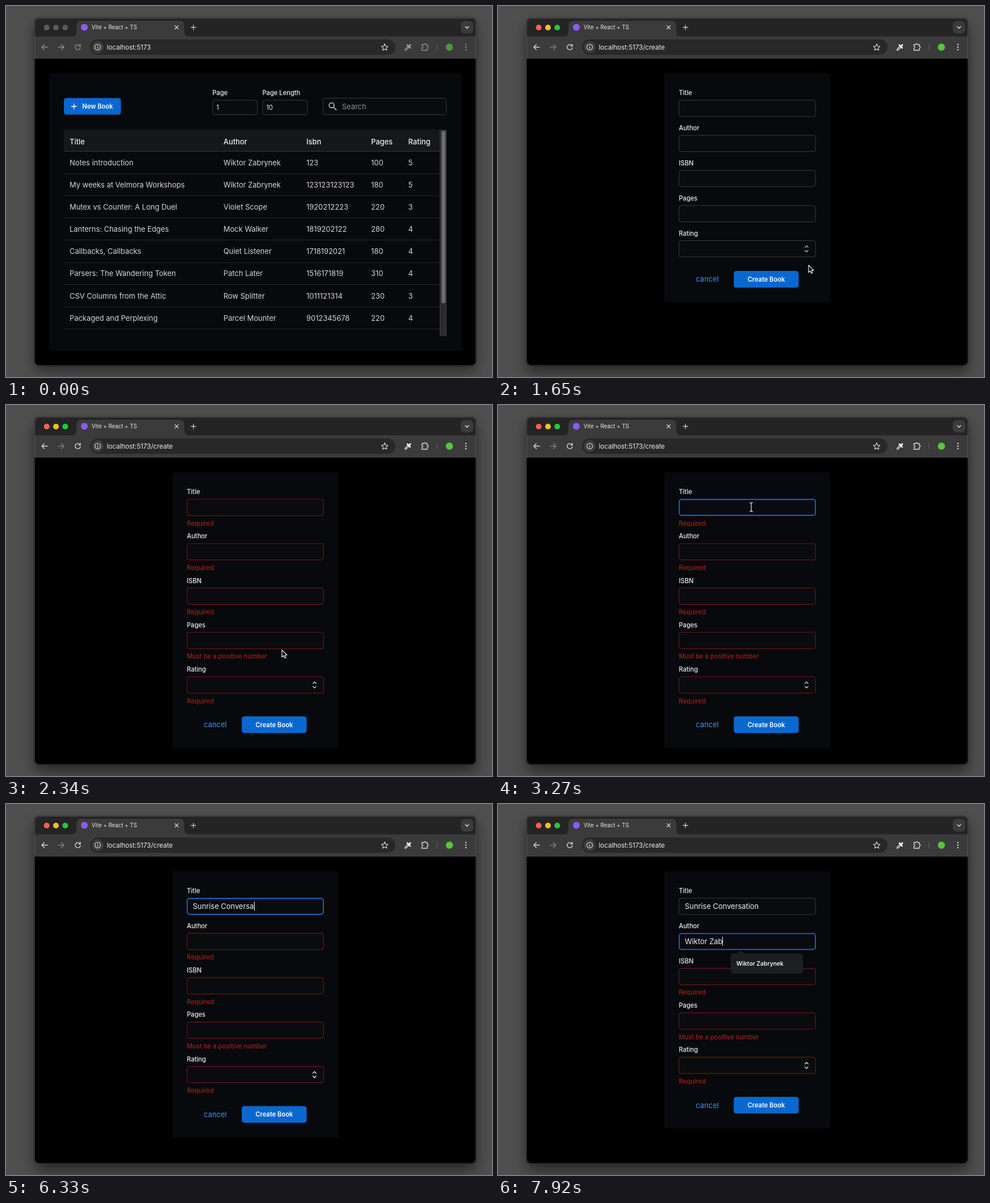
An HTML page that plays this animation: 856x654 px, repeating every 8 s.

```html
<!DOCTYPE html>
<html lang="en">
<head>
<meta charset="utf-8">
<title>Book form</title>
<style>
html, body { margin: 0; width: 100%; height: 100%; overflow: hidden; background: #4f4f4f; }
#shade { position: absolute; left: 50px; top: 21px; width: 778px; height: 613px; border-radius: 9px; background: #000; box-shadow: 0 10px 22px rgba(0,0,0,.42), 0 0 3px rgba(0,0,0,.6); }
#shade.on { box-shadow: 0 12px 24px rgba(0,0,0,.48), 0 0 2px rgba(0,0,0,.7); }
svg { position: absolute; left: 0; top: 0; display: block; }
text { font-family: Inter, "Open Sans", sans-serif; white-space: pre; }
</style>
</head>
<body>
<div id="shade"></div>
<svg width="856" height="654" viewBox="0 0 856 654">
  <defs><clipPath id="win"><rect x="50" y="21" width="778" height="613" rx="9"/></clipPath></defs>
  <g clip-path="url(#win)">
    <rect x="50" y="21" width="778" height="613" fill="#000"/>
    <g id="chrome"></g>
    <g id="page"></g>
  </g>
  <rect x="50.5" y="21.5" width="777" height="612" rx="8.5" fill="none" stroke="#fff" stroke-opacity=".18"/>
  <rect id="caret" width="1" height="16" fill="#fff"/>
  <g id="arrow"><path d="M0 0V12.6L2.9 9.9L4.9 14.2L7 13.2L5.1 9.1L9 8.9Z" fill="#000" stroke="#fff" stroke-width="1.1" stroke-linejoin="round"/></g>
  <g id="beam"><path d="M-3-8Q0-8 0-5.5V5.5Q0 8-3 8M3-8Q0-8 0-5.5M0 5.5Q0 8 3 8" fill="none" stroke="#fff" stroke-width="1.1"/></g>
</svg>
<script>
const LOOP = 8000;
const $ = id => document.getElementById(id);

const BODY = 12.9, LABEL = 11.15;
const INK = '#edeef0', CELL = '#d4d7da', EDGE = '#383b3f', BLUE = '#0868cf', RED = '#a31e1c', RED_EDGE = '#6c1616';

const BOOKS = [
  ['Notes introduction', 'Wiktor Zabrynek', '123', 100, 5],
  ['My weeks at Velmora Workshops', 'Wiktor Zabrynek', '123123123123', 180, 5],
  ['Mutex vs Counter: A Long Duel', 'Violet Scope', '1920212223', 220, 3],
  ['Lanterns: Chasing the Edges', 'Mock Walker', '1819202122', 280, 4],
  ['Callbacks, Callbacks', 'Quiet Listener', '1718192021', 180, 4],
  ['Parsers: The Wandering Token', 'Patch Later', '1516171819', 310, 4],
  ['CSV Columns from the Attic', 'Row Splitter', '1011121314', 230, 3],
  ['Packaged and Perplexing', 'Parcel Mounter', '9012345678', 220, 4]
];
const HEADS = ['Title', 'Author', 'Isbn', 'Pages', 'Rating'];
const COLS = [112, 383, 529, 643, 708.5];

const TYPED = [
  { text: 'Sunrise Conversation',
    at: [3600, 3900, 4620, 4710, 4800, 4920, 5100, 5220, 5550, 5700, 5730, 5880, 5970, 6060, 6180, 6330, 6480, 6510, 6570, 6600] },
  { text: 'Wiktor Zab',
    at: [7080, 7140, 7200, 7290, 7380, 7440, 7530, 7710, 7830, 7920] }
];
const OPEN = 1230, SUBMIT = 2100, FOCUS = 2820, NEXT = 6750, HINT = 7140;
const CARET_OFF = [[3270, 3600], [4350, 4620]];

// Pointer stops: time, x, y, easing of the way there
const smooth = u => u * u * (3 - 2 * u);
const speedUp = u => u * u;
const slowDown = u => 1 - (1 - u) ** 2.4;
const STOPS = [
  [30, 330, 656, smooth],
  [810, 166, 177, slowDown],
  [1200, 166, 177, smooth],
  [1650, 547, 457, smooth],
  [2010, 479, 484, smooth],
  [2130, 479, 484, smooth],
  [2340, 486.3, 434, speedUp],
  [2640, 449, 165, slowDown],
  [2790, 446, 180, smooth]
];

// Drawing helpers
const text = (x, y, s, size = BODY, fill = INK, weight = 400, extra = '') =>
  `<text x="${x}" y="${y + size * .36}" font-size="${size}" font-weight="${weight}" fill="${fill}" ${extra}>${s}</text>`;
const label = (x, y, s, fill = INK) => text(x, y, s, LABEL, fill, 500);
const rect = (x, y, w, h, fill, r = 0, extra = '') =>
  `<rect x="${x}" y="${y}" width="${w}" height="${h}" rx="${r}" fill="${fill}" ${extra}/>`;
const dot = (x, y, r, fill) => `<circle cx="${x}" cy="${y}" r="${r}" fill="${fill}"/>`;
const line = (d, stroke, w = 1.3) =>
  `<path d="${d}" fill="none" stroke="${stroke}" stroke-width="${w}" stroke-linecap="round" stroke-linejoin="round"/>`;
const field = (x, y, w, h, edge = EDGE, sw = 1) =>
  rect(x, y, w, h, '#0a0b0e', 4, `stroke="${edge}" stroke-width="${sw}"`);

function drawChrome(active, url) {
  const ico = active ? '#dcdcdc' : '#8f8f8f', dim = active ? '#808080' : '#8f8f8f';
  const lights = active ? ['#ff5f57', '#febc2e', '#28c840'] : ['#5b5b5b', '#5b5b5b', '#5b5b5b'];
  return rect(50, 21, 778, 33, '#242424') + rect(50, 53.5, 778, 38.5, '#3b3b3b') +
    rect(50, 91.5, 778, 1, '#4a4a4a') +
    lights.map((c, i) => dot(71.7 + i * 16.3, 38, 5, c)).join('') +
    '<path d="M115 54Q124 54 124 45V35Q124 26 133 26H305Q314 26 314 35V45Q314 54 323 54Z" fill="#3b3b3b"/>' +
    dot(138, 37.5, 6, '#8b5cf6') +
    text(150.8, 37.5, 'Vite + React + TS', 9.7, '#e8e8e8') +
    line('M297.5 34.7L303.5 40.7M303.5 34.7L297.5 40.7', '#e8e8e8', 1.2) +
    line('M326 37.7H334.4M330.2 33.5V41.9', '#d8d8d8', 1.2) +
    rect(801, 26.5, 22, 22, '#3b3b3b', 7) +
    line('M809 36.3L812 39.3L815 36.3', '#e8e8e8') +
    line('M73 72.5H63.5M67.5 68L63 72.5L67.5 77', ico) +
    line('M92 72.5H101.5M97.5 68L102 72.5L97.5 77', dim) +
    line('M130 69.6A4.6 4.6 0 1 0 131 73.3M131 67.5V70.6H127.8', ico) +
    rect(148, 59, 538, 27, '#282828', 13.5) + dot(161.5, 72.5, 10.5, '#3d3d3d') +
    '<circle cx="161.5" cy="72.5" r="5" fill="none" stroke="#e3e3e3" stroke-width="1.1"/>' +
    line('M161.5 72V75M161.5 69.9V70', '#e3e3e3', 1.2) +
    text(177.5, 72.5, url, 11.55, '#ececec') +
    line('M667 66.8L668.7 70.7L672.8 71.1L669.7 73.9L670.6 78L667 75.9L663.4 78L664.3 73.9L661.2 71.1L665.3 70.7Z', '#e3e3e3', 1.1) +
    line('M702.8 78L703.3 75.8L708.5 70.6L710.2 72.3L705 77.5Z', active ? '#c4dcf8' : '#8194aa', 1.5) +
    line('M707 69L711.8 73.8M709.6 71.3L712.2 68.7', active ? '#fff' : '#a5a5a5', 2.6) +
    line('M732.5 68H736A1.6 1.6 0 0 1 739.2 68H742V71A1.7 1.7 0 0 1 742 74.4V78H732.5V74.6A1.7 1.7 0 0 0 732.5 71.2Z', ico) +
    line('M759 67.5V77.5', '#666', 1) +
    dot(781, 72.5, 6.3, active ? '#52c83c' : '#489b39') +
    [68, 72.5, 77].map(y => dot(810, y, 1.25, ico)).join('');
}

function drawTable() {
  let s = rect(76, 118.5, 726, 490, '#08090c', 4) +
    rect(102, 162.3, 100.5, 29.3, BLUE, 4.5) +
    line('M115.3 177H124.3M119.8 172.5V181.5', '#fff') +
    text(134.3, 177, 'New Book', 11.1, '#fff', 600) +
    label(363.5, 153, 'Page') + label(451.5, 153, 'Page Length') +
    field(364, 166, 79, 25.5) + field(452, 166, 79, 25.5) + field(558, 162.5, 217.5, 29) +
    text(370.5, 179, '1', LABEL) + text(458.5, 179, '10', LABEL) +
    '<circle cx="573.5" cy="175" r="4.4" fill="none" stroke="#b0b4ba" stroke-width="1.6"/>' +
    line('M576.8 178.3L581.5 183', '#b0b4ba', 1.8) +
    text(591.8, 177, 'Search', BODY, '#8b8f94') +
    rect(102, 218, 662, 38, '#14181a') + rect(102, 255.6, 662, 1, '#3a3e41');
  HEADS.forEach((h, c) => s += text(COLS[c], 239, h, BODY, INK, 500));
  BOOKS.forEach((row, i) => {
    const y = 276 + i * 39.15;
    row.forEach((v, c) => s += text(COLS[c], y, v, BODY, CELL));
    s += rect(102, Math.round(y + 19), 662, 1, '#25282b');
  });
  return s + rect(764, 218, 12, 364, '#2b2b2b') + rect(764, 218, 1, 364, '#3e3e3e') +
    rect(775, 218, 1, 364, '#3e3e3e') + rect(767, 220, 7, 304, '#6b6b6b', 3.5);
}

const FIELDS = ['Title', 'Author', 'ISBN', 'Pages', 'Rating'];

function formState(t) {
  const sent = t >= SUBMIT;
  const errors = FIELDS.map((_, i) => sent && !(i < 2 && t >= TYPED[i].at[0]));
  const tops = [];
  let y = 153;
  errors.forEach(e => { tops.push(y); y += e ? 78.25 : 61.9; });
  const focus = t < FOCUS ? -1 : t < NEXT ? 0 : 1;
  const values = TYPED.map(f => f.text.slice(0, f.at.filter(a => t >= a).length));
  return { errors, tops, focus, values, btn: y + 4.6, hint: t >= HINT };
}

function drawForm(f) {
  let s = rect(293, 118.5, 292.5, f.btn + 55.3 - 118.5, '#08090c', 4);
  FIELDS.forEach((name, i) => {
    const y = f.tops[i], err = f.errors[i], on = f.focus == i;
    s += label(318.5, y, name);
    s += on ? field(319.2, y + 13.5, 239.8, 28, '#1767cf', 1.8)
            : field(318.9, y + 13, 240.4, 28.8, err ? RED_EDGE : EDGE, err ? 1.2 : 1);
    if (f.values[i]) s += text(329, y + 27.5, f.values[i], BODY, INK, 400, `id="value${i}"`);
    if (err) s += label(318.5, y + 55.5, i == 3 ? 'Must be a positive number' : 'Required', RED);
    if (i == 4) {
      const m = y + 27.5;
      s += line(`M540.6 ${m - 2.6}L543.4 ${m - 5.4}L546.2 ${m - 2.6}M540.6 ${m + 2.6}L543.4 ${m + 5.4}L546.2 ${m + 2.6}`, err ? INK : '#b0b4ba');
    }
  });
  s += text(348.3, f.btn + 14.7, 'cancel', 13, '#4590e6') +
    rect(415.2, f.btn, 114.4, 29.4, BLUE, 4.5) +
    text(472.4, f.btn + 14.7, 'Create Book', 11.1, '#fff', 600, 'text-anchor="middle"');
  if (f.hint) {
    s += '<path d="M420 264L427.5 257.5L435 264Z" fill="#1d1e1f"/>' +
      rect(410, 263.5, 127, 35.5, '#1d1e1f', 5) +
      text(419.8, 281.7, 'Wiktor Zabrynek', 10.3, '#f2f2f2', 600);
  }
  return s;
}

function pointer(t) {
  let a = STOPS[0];
  for (const b of STOPS) {
    if (t < b[0]) {
      const u = b[3](Math.max(0, (t - a[0]) / (b[0] - a[0] || 1)));
      return [a[1] + (b[1] - a[1]) * u, a[2] + (b[2] - a[2]) * u];
    }
    a = b;
  }
  return [a[1], a[2]];
}

const show = (el, on) => el.setAttribute('visibility', on ? 'visible' : 'hidden');
const last = {};
function update(id, key, draw) {
  if (last[id] === key) return;
  last[id] = key;
  $(id).innerHTML = draw();
}

function render(t) {
  const active = t >= 60, form = t >= OPEN, f = formState(t);
  $('shade').className = active ? 'on' : '';
  update('chrome', `${active}${form}`, () => drawChrome(active, form ? 'localhost:5173/create' : 'localhost:5173'));
  update('page', form ? JSON.stringify(f) : 'table', () => form ? drawForm(f) : drawTable());

  const caretOn = f.focus >= 0 && !CARET_OFF.some(([a, b]) => t >= a && t < b);
  show($('caret'), caretOn);
  if (caretOn) {
    const value = $('value' + f.focus);
    $('caret').setAttribute('x', 329 + Math.round(value ? value.getComputedTextLength() : 0));
    $('caret').setAttribute('y', Math.round(f.tops[f.focus] + 19));
  }

  const [x, y] = pointer(t), seen = t >= 30 && t < TYPED[0].at[0];
  const overField = form && x > 318 && x < 560 && f.tops.slice(0, 4).some(top => y > top + 13 && y < top + 42);
  show($('arrow'), seen && !overField);
  show($('beam'), seen && overField);
  for (const id of ['arrow', 'beam']) $(id).setAttribute('transform', `translate(${x.toFixed(2)} ${y.toFixed(2)})`);
}

const start = performance.now();
function tick() {
  render((performance.now() - start) % LOOP);
  requestAnimationFrame(tick);
}
tick();
</script>
</body>
</html>
```
